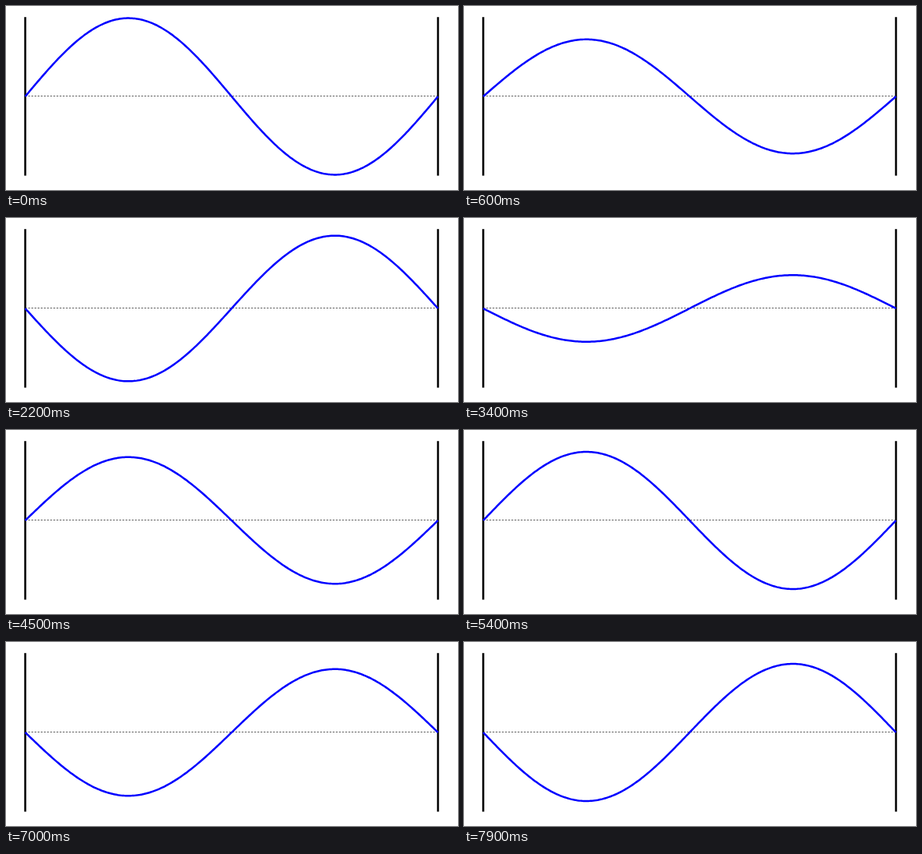
These frames come from a looping animation (576x236 px, 8 s). An HTML page with a canvas:

```html
<!DOCTYPE html>
<html lang="en">
<head>
<meta charset="utf-8">
<title>Standing wave</title>
<style>
html, body { margin: 0; width: 100%; height: 100%; overflow: hidden; background: #fff; }
canvas { display: block; }
</style>
</head>
<body>
<canvas id="stage" width="576" height="236"></canvas>
<script>
const ctx = document.getElementById('stage').getContext('2d');
const LEFT = 24.5, RIGHT = 550.5, MID = 116, AMP = 100.4;
const LOOP = 8000, STEP = 100, PERIOD = 5000;

function line(x1, y1, x2, y2, color, width, dash = []) {
  ctx.strokeStyle = color;
  ctx.lineWidth = width;
  ctx.setLineDash(dash);
  ctx.beginPath();
  ctx.moveTo(x1, y1);
  ctx.lineTo(x2, y2);
  ctx.stroke();
}

function rope(amp) {
  ctx.strokeStyle = '#00f';
  ctx.lineWidth = 2.5;
  ctx.lineJoin = 'round';
  ctx.setLineDash([]);
  ctx.beginPath();
  const n = 263;
  for (let i = 0; i <= n; i++) {
    const u = i / n;
    ctx.lineTo(LEFT + (RIGHT - LEFT) * u, MID - amp * Math.sin(2 * Math.PI * u));
  }
  ctx.stroke();
}

function draw(t) {
  ctx.fillStyle = '#fff';
  ctx.fillRect(0, 0, 576, 236);
  line(LEFT, 115.5, RIGHT, 115.5, '#444', 1, [2, 2]);
  for (const x of [LEFT, RIGHT]) line(x, 14.2, x, 217.6, '#000', 2.5);
  rope(AMP * Math.cos(2 * Math.PI * t / PERIOD));
}

const start = performance.now();
function tick() {
  const t = (performance.now() - start) % LOOP;
  draw(Math.floor(t / STEP) * STEP);
  requestAnimationFrame(tick);
}
tick();
</script>
</body>
</html>
```
